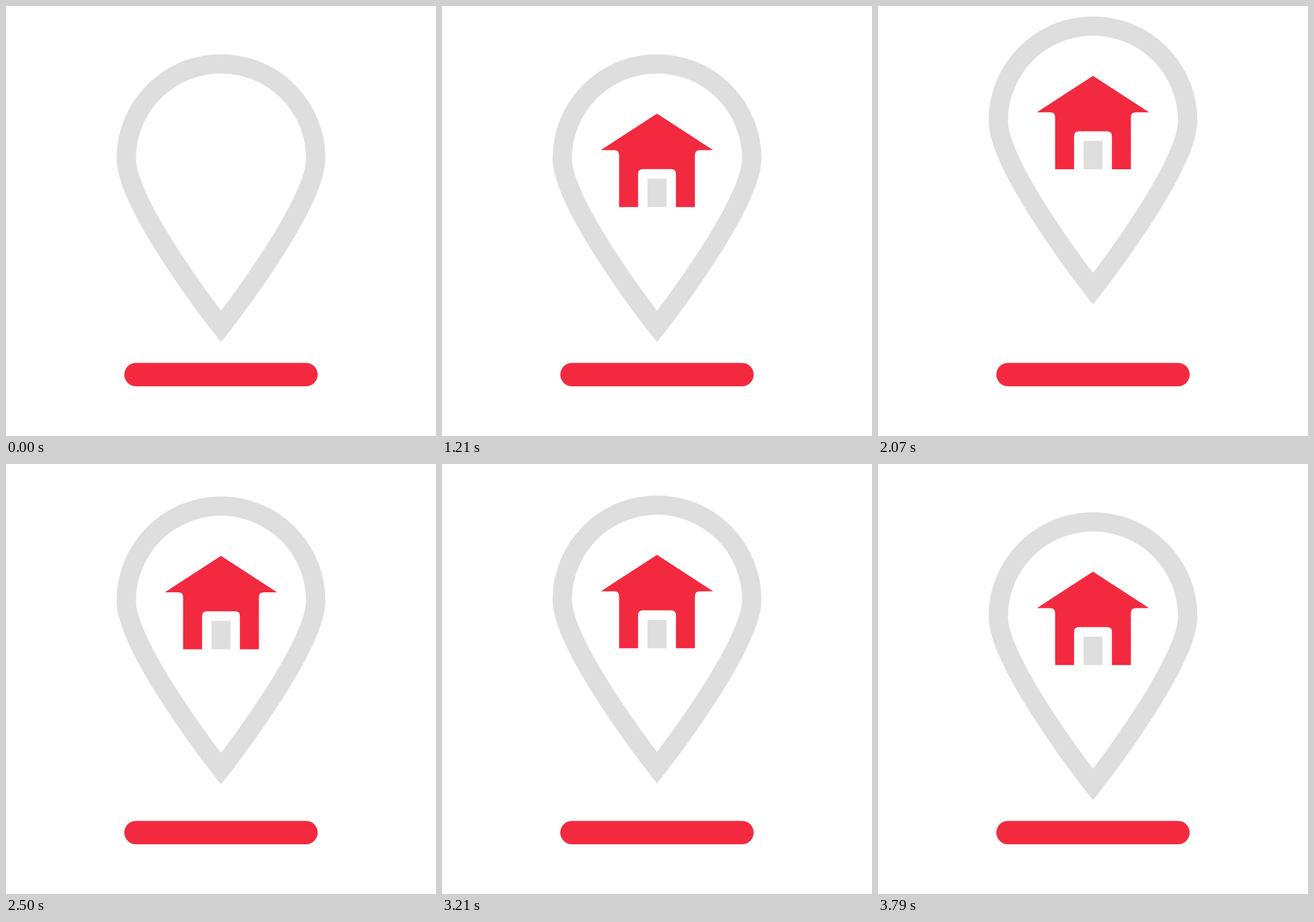
An HTML page that plays this animation: 640 px wide and 640 px high, repeating every 3870 ms.

```html
<!DOCTYPE html>
<html lang="en">
<head>
<meta charset="utf-8">
<title>Home location</title>
<style>
  html, body { margin: 0; width: 100%; height: 100%; overflow: hidden; background: #fff; }
  svg { display: block; width: 100%; height: 100%; }
</style>
</head>
<body>
<svg viewBox="0 0 640 640">
  <g id="pin">
    <path d="M179 227a141 141 0 0 1 282 0c0 71-141 250-141 250S179 298 179 227z"
      fill="none" stroke="#dedede" stroke-width="28.8" stroke-miterlimit="10"/>
    <!-- house and door have their origin at the middle of the base -->
    <path id="house" fill="#f3293f" d="M0-139L83.5-84.8H63.5q-7.1 0-7.1 7.1V0H28.2V-49.3
      q0-7.1-7.1-7.1H-21.1q-7.1 0-7.1 7.1V0H-56.4V-77.7q0-7.1-7.1-7.1H-83.5z"/>
    <path id="door" fill="#dedede" d="M-14.1 0V-42.3H14.1V0z"/>
  </g>
  <rect x="176.1" y="531.2" width="287.8" height="34.8" rx="17.4" fill="#f3293f"/>
</svg>
<script>
const LOOP = 3870, BASE = 299.2;
const [pin, house, door] = ['pin', 'house', 'door'].map(id => document.getElementById(id));

const sine = u => (1 - Math.cos(Math.PI * u)) / 2;
const power = n => u => u ** n;
const span = (t, from, to) => Math.min(1, Math.max(0, (t - from) / (to - from)));
const mix = (a, b, u) => a + (b - a) * u;

// keys: [time, value, easing towards this value]
function track(t, keys) {
  let value = keys[0][1];
  for (let i = 1; i < keys.length && t > keys[i - 1][0]; i++) {
    const [end, target, ease] = keys[i];
    value = mix(keys[i - 1][1], target, ease(span(t, keys[i - 1][0], end)));
  }
  return value;
}

function place(el, y, scale, angle = 0) {
  el.setAttribute('transform', `translate(320 ${y}) rotate(${angle}) scale(${scale})`);
  el.style.display = scale > 0 ? '' : 'none';
}

function hop(t) {
  const start = 1640, period = 704, half = period / 2;
  if (t < start || t > start + 3 * period) return 0;
  const p = (t - start) % period;
  return -56.4 * (p < half ? sine(p / half) : 1 - (p / half - 1) ** 4);
}

function draw(t) {
  const size = track(t, [[0, 0], [350, 1.1, power(1.4)], [570, 1, power(2)]]);
  const angle = track(t, [[0, 113], [430, -35, power(2)], [570, 0, sine]]);
  place(house, BASE, size, angle);

  const rise = 145 * (1 - sine(span(t, 720, 1210)));
  const grow = track(t, [[720, 0], [965, 1.3, sine], [1210, 1, sine]]);
  place(door, BASE + rise, grow);

  pin.setAttribute('transform', `translate(0 ${hop(t)})`);
}

const begin = performance.now();
function tick() {
  draw((performance.now() - begin) % LOOP);
  requestAnimationFrame(tick);
}
tick();
</script>
</body>
</html>
```
